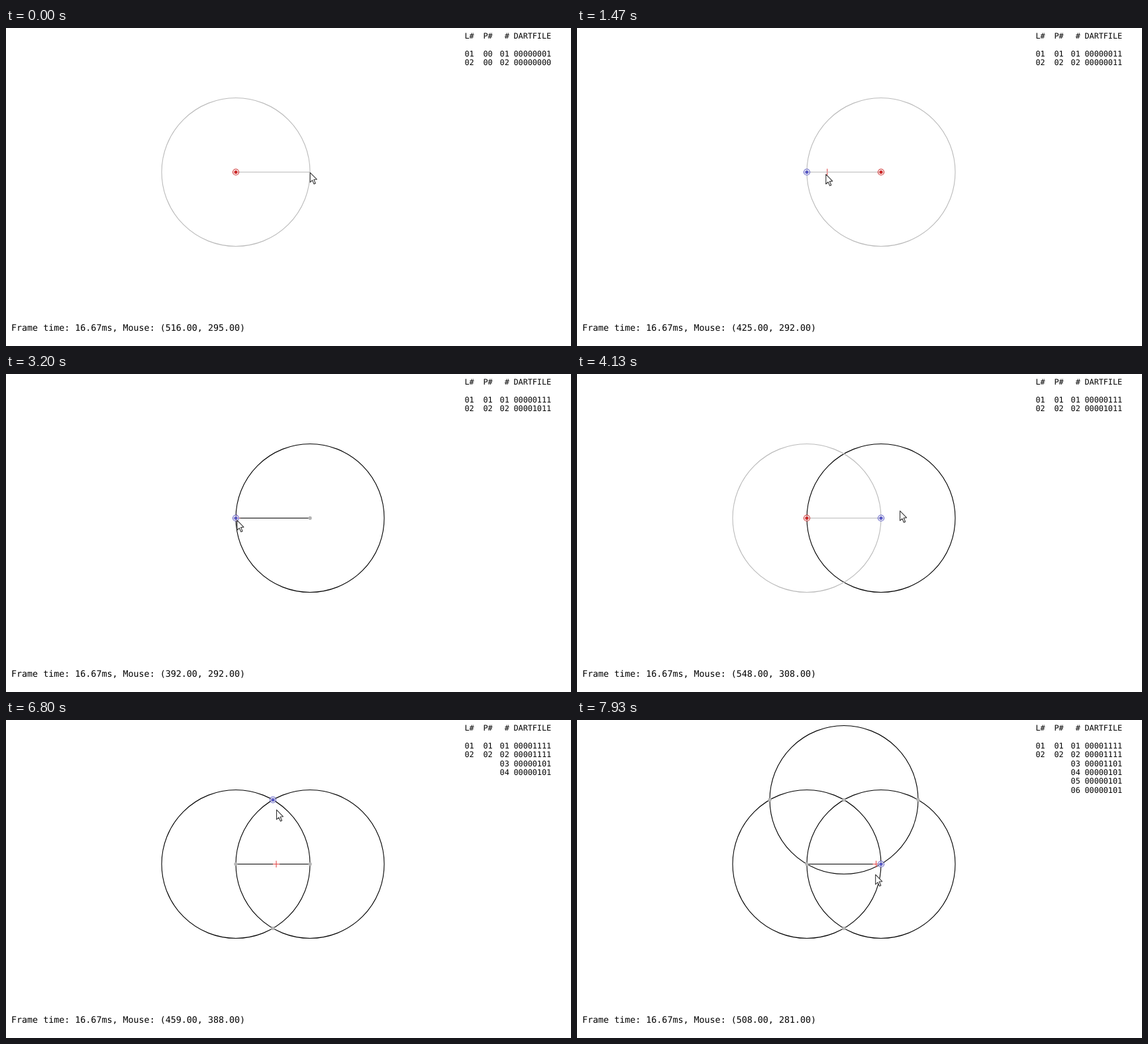
Animation of 853 by 480 pixels, one loop 8 s. Source, as an HTML page:

```html
<!DOCTYPE html>
<html lang="en">
<head>
<meta charset="utf-8">
<title>Compass construction</title>
<style>
html, body { margin: 0; width: 100%; height: 100%; overflow: hidden; background: #fff; }
svg { display: block; width: 853px; height: 480px; }
text {
  font: 13.33px "DejaVu Sans Mono", monospace;
  fill: #000; white-space: pre; text-rendering: geometricPrecision;
}
#table text { font-size: 11.75px; }
path, circle { stroke-width: 1.1; }
.ink { fill: none; stroke: #000; }
.ghost { fill: none; stroke: #bbb; }
.cross { fill: none; stroke: #e04848; }
.line { stroke-width: 1; }
</style>
</head>
<body>
<svg viewBox="0 0 853 480">
  <g id="scene"></g>
  <g id="table"></g>
  <text id="status" x="8" y="457"></text>
  <path id="cursor" d="M0 0V14.6L3.3 11.6L5.9 17.2L8.1 16.2L5.6 10.6L10 10.2Z"
        fill="#fff" stroke="#333" stroke-linejoin="round"/>
</svg>
<script>
const FPS = 15, TICKS = 120, SCALE = 8 / 9, R = 112;
const $ = id => document.getElementById(id);

const A = [347, 217.5], B = [A[0] + R, A[1]];
const polar = ([x, y], deg) => {
  const a = deg * Math.PI / 180;
  return [x + R * Math.cos(a), y - R * Math.sin(a)];
};
const TOP = polar(A, 60), BOTTOM = polar(A, -60);
const POINTS = [A, B, TOP, BOTTOM, polar(TOP, 180), polar(TOP, 0)];

// The first drag makes the segment AB, each later one a circle
const DRAGS = [
  { from: 0, to: 3, origin: A },
  { from: 18, to: 41, origin: B },
  { from: 54, to: 85, origin: A },
  { from: 106, to: 116, origin: TOP }
];

const linear = p => p;
const smooth = p => p * p * (3 - 2 * p);
const brake = p => 1 - (1 - p) ** 4;

// Mouse moves in ticks; y points up
const HOME = [516, 295];
const MOVES = [
  { start: 5.6, span: 2.4, to: [533, 290], ease: smooth },
  { start: 9.6, span: 3.4, to: [517, 293], ease: smooth },
  { start: 17.6, span: 8.7, to: [419, 292], ease: brake },
  { start: 44.6, span: 3.4, to: [392, 292], ease: smooth },
  { start: 53.6, span: 2.4, to: [548, 303], ease: smooth },
  { start: 59.6, span: 2.4, to: [548, 308], ease: smooth },
  { start: 88.6, span: 2.4, to: [503, 288], ease: linear },
  { start: 91, span: 1.6, to: [456, 285], ease: linear },
  { start: 92.6, span: 9.4, to: [459, 388], ease: smooth },
  { start: 102.6, span: 1.4, to: [458, 388], ease: linear },
  { start: 105.6, span: 5.4, to: [515, 293], ease: smooth },
  { start: 115.6, span: 6.6, to: [502, 270], ease: smooth }
];

function mouseAt(tick) {
  return MOVES.reduce((pos, m) => {
    const p = Math.min(1, Math.max(0, (tick - m.start) / m.span));
    return pos.map((v, i) => v + (m.to[i] - v) * m.ease(p));
  }, HOME);
}

const toScreen = ([x, y]) => [x * SCALE, (540 - y) * SCALE];
const dist = (p, q) => Math.hypot(p[0] - q[0], p[1] - q[1]);
const isOn = (p, center) => Math.abs(dist(p, center) - R) < 0.1;

function stateAt(tick) {
  const hasLine = tick >= DRAGS[0].to;
  const circles = DRAGS.slice(1).filter(d => tick >= d.to).map(d => d.origin);
  const points = POINTS.filter((p, i) =>
    i < 2 ? hasLine : circles.filter(c => isOn(p, c)).length > 1);
  const drag = DRAGS.find(d => tick >= d.from && tick < d.to);
  return { hasLine, circles, points, drag };
}

const circle = ([x, y], r, attrs) => `<circle cx="${x}" cy="${y}" r="${r}" ${attrs}/>`;
const line = (p, q, cls) => `<path class="line ${cls}" d="M${p}L${q}"/>`;
const label = (x, y, s) => `<text x="${x}" y="${y}">${s}</text>`;
const dot = p => circle(p, 2.7, 'fill="#b4b4b4"');
const marker = (p, color) =>
  circle(p, 4.5, `fill="#fff" fill-opacity=".6" stroke="${color}"`) +
  circle(p, 2.6, `fill="${color}"`);

function drawScene({ hasLine, circles, points, drag }, mouse) {
  const near = points.length
    ? points.reduce((a, b) => dist(b, mouse) < dist(a, mouse) ? b : a) : null;
  let out = circles.map(c => circle(c, R, 'class="ink"')).join("");

  if (hasLine) {
    const x = mouse[0];
    out += line(A, B, "ink");
    if (x > A[0] && x < B[0] - 0.5)
      out += `<path class="cross" d="M${x - 5} ${A[1]}h10M${x} ${A[1] - 5}v10"/>`;
  }
  if (drag) {
    const end = near || B;
    if (end !== drag.origin)
      out += circle(drag.origin, dist(drag.origin, end), 'class="ghost"') +
             line(drag.origin, end, "ghost");
  }
  out += points.map(dot).join("");
  if (near) out += marker(near, "#5a5ac4");
  if (drag) out += marker(drag.origin, "#cc2a2a");
  return out;
}

// Bits: exists, segment end, on a circle, circle centre
function flags(p, { hasLine, circles }) {
  const bits = [
    circles.includes(p),
    circles.some(c => isOn(p, c)),
    hasLine && (p === A || p === B),
    hasLine || p === A
  ];
  return bits.map(Number).join("").padStart(8, "0");
}

function drawTable(state) {
  const two = n => String(n).padStart(2, "0");
  const col = { l: 692.5, p: 720.5, n: 745.6, bits: 766.5 };
  const head = 16.3;
  let out = label(col.l, head, "L#") + label(col.p, head, "P#") +
            label(col.n, head, " #") + label(col.bits, head, "DARTFILE");
  const rows = state.hasLine ? state.points : [A, B];
  rows.forEach((p, i) => {
    const y = 43 + i * 13.33, n = two(i + 1);
    if (i < 2) out += label(col.l, y, n) + label(col.p, y, state.hasLine ? n : "00");
    out += label(col.n, y, n) + label(col.bits, y, flags(p, state));
  });
  return out;
}

let last = -1;
function render(ms) {
  const tick = Math.floor(ms * FPS / 1000 + 0.06) % TICKS;
  if (tick === last) return;
  last = tick;
  const state = stateAt(tick);
  const pos = mouseAt(tick).map(Math.round);
  const [cx, cy] = toScreen(mouseAt(tick + 0.6)); // pointer leads the readout
  $("scene").innerHTML = drawScene(state, toScreen(pos));
  $("table").innerHTML = drawTable(state);
  $("status").textContent =
    `Frame time: 16.67ms, Mouse: (${pos.map(v => v.toFixed(2)).join(", ")})`;
  $("cursor").setAttribute("transform", `translate(${cx + 0.5} ${cy + 0.5})`);
}

const start = performance.now();
function loop() {
  render(performance.now() - start);
  requestAnimationFrame(loop);
}
loop();
</script>
</body>
</html>
```
